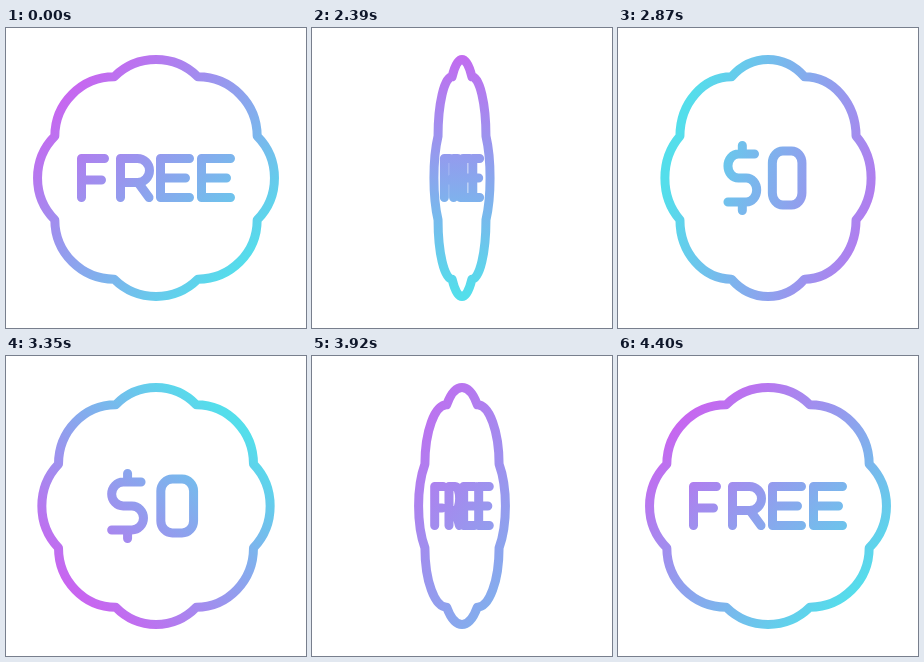
These frames come from a looping animation (300x300 px, 4430 ms). An HTML page with a canvas:

```html
<!DOCTYPE html>
<html lang="en">
<head>
<meta charset="utf-8">
<title>Free badge</title>
<style>
  html, body { margin: 0; width: 100%; height: 100%; overflow: hidden; background: #fff; }
  canvas { display: block; width: 300px; height: 300px; }
</style>
</head>
<body>
<canvas id="stage" width="300" height="300" role="img" aria-label="FREE, $0"></canvas>
<script>
const ctx = document.getElementById('stage').getContext('2d');
const LOOP = 4430, FLIP_START = 2030, STEP = 30;
const CENTER = 150, STROKE = 9;
const PURPLE = '#c865f0', CYAN = '#54deeb';

// Shapes are centred on the origin
const badge = scallop(8, 109.5, 59.4);
const letterE = x =>
  `M${x + 29} -19.5H${x}V19.5H${x + 29}M${x} 0H${x + 25}`;
const freeText = new Path2D(
  'M-51.5 -19.5H-74.5V19.5M-74.5 2H-54.5' +
  'M-35.5 19.5V-19.5H-18.5A12 12 0 0 1 -18.5 4.5H-35.5M-18 4.5L-7 19.5' +
  letterE(4.5) + letterE(45.5));
const zeroText = new Path2D(
  'M-15.5 -24H-34A12 12 0 0 0 -34 0H-25A12 12 0 0 1 -25 24H-46' +
  'M-29.5 -32.5V-24M-29.5 24V32.5' +
  'M17 -27H27A12 12 0 0 1 39 -15V15A12 12 0 0 1 27 27H17A12 12 0 0 1 5 15V-15A12 12 0 0 1 17 -27Z');

// Each row: time, then values at that time
const turnTrack = [
  [2000, 0], [2390, 76.3], [2870, 150.5], [3080, 169.4],
  [3350, 195.5], [3920, 291.5], [4160, 329], [4400, 360]
];
// Purple end x, y, then cyan end x, y
const gradientTrack = [
  [2000, 62, 62, 238, 238],
  [2390, 150, 15, 150, 265],
  [2870, 302, 191, 57, 125],
  [3350, 75, 240, 232, 70],
  [3920, 55, 76, 327, 287],
  [4400, 62, 62, 238, 238]
];

function scallop(count, notchRadius, lobeRadius) {
  let d = '';
  for (let i = 0; i <= count; i++) {
    const angle = (i - 0.5) * 2 * Math.PI / count;
    const x = notchRadius * Math.cos(angle), y = notchRadius * Math.sin(angle);
    d += i ? `A${lobeRadius} ${lobeRadius} 0 0 1 ${x} ${y}` : `M${x} ${y}`;
  }
  return new Path2D(d + 'Z');
}

// Smooth curve through the keys of a track
function sample(track, time) {
  const last = track.length - 1;
  if (time <= track[0][0]) return track[0].slice(1);
  if (time >= track[last][0]) return track[last].slice(1);
  const i = track.findIndex(key => key[0] > time) - 1;
  const a = track[i], b = track[i + 1];
  const before = track[Math.max(0, i - 1)], after = track[Math.min(last, i + 2)];
  const span = b[0] - a[0], u = (time - a[0]) / span;
  return a.slice(1).map((from, k) => {
    const n = k + 1, to = b[n];
    const slopeA = (to - before[n]) / (b[0] - before[0]) * span;
    const slopeB = (after[n] - from) / (after[0] - a[0]) * span;
    const u2 = u * u, u3 = u2 * u;
    return (2 * u3 - 3 * u2 + 1) * from + (u3 - 2 * u2 + u) * slopeA +
           (3 * u2 - 2 * u3) * to + (u3 - u2) * slopeB;
  });
}

// Squeezes the geometry but keeps the line weight
function strokeSqueezed(shape, scaleX) {
  const path = new Path2D();
  path.addPath(shape, new DOMMatrix([scaleX, 0, 0, 1, CENTER, CENTER]));
  ctx.stroke(path);
}

function draw(time) {
  const t = time < FLIP_START
    ? 0
    : FLIP_START + Math.floor((time - FLIP_START) / STEP) * STEP;
  const facing = Math.cos(sample(turnTrack, t)[0] * Math.PI / 180);
  const scaleX = Math.max(0.005, Math.abs(facing));
  const gradient = ctx.createLinearGradient(...sample(gradientTrack, t));
  gradient.addColorStop(0, PURPLE);
  gradient.addColorStop(1, CYAN);

  ctx.fillStyle = '#fff';
  ctx.fillRect(0, 0, 300, 300);
  ctx.strokeStyle = gradient;
  ctx.lineWidth = STROKE;
  ctx.lineCap = ctx.lineJoin = 'round';
  strokeSqueezed(badge, scaleX);
  strokeSqueezed(facing > 0 ? freeText : zeroText, scaleX);
}

const startTime = performance.now();
function tick() {
  draw((performance.now() - startTime) % LOOP);
  requestAnimationFrame(tick);
}
tick();
</script>
</body>
</html>
```
